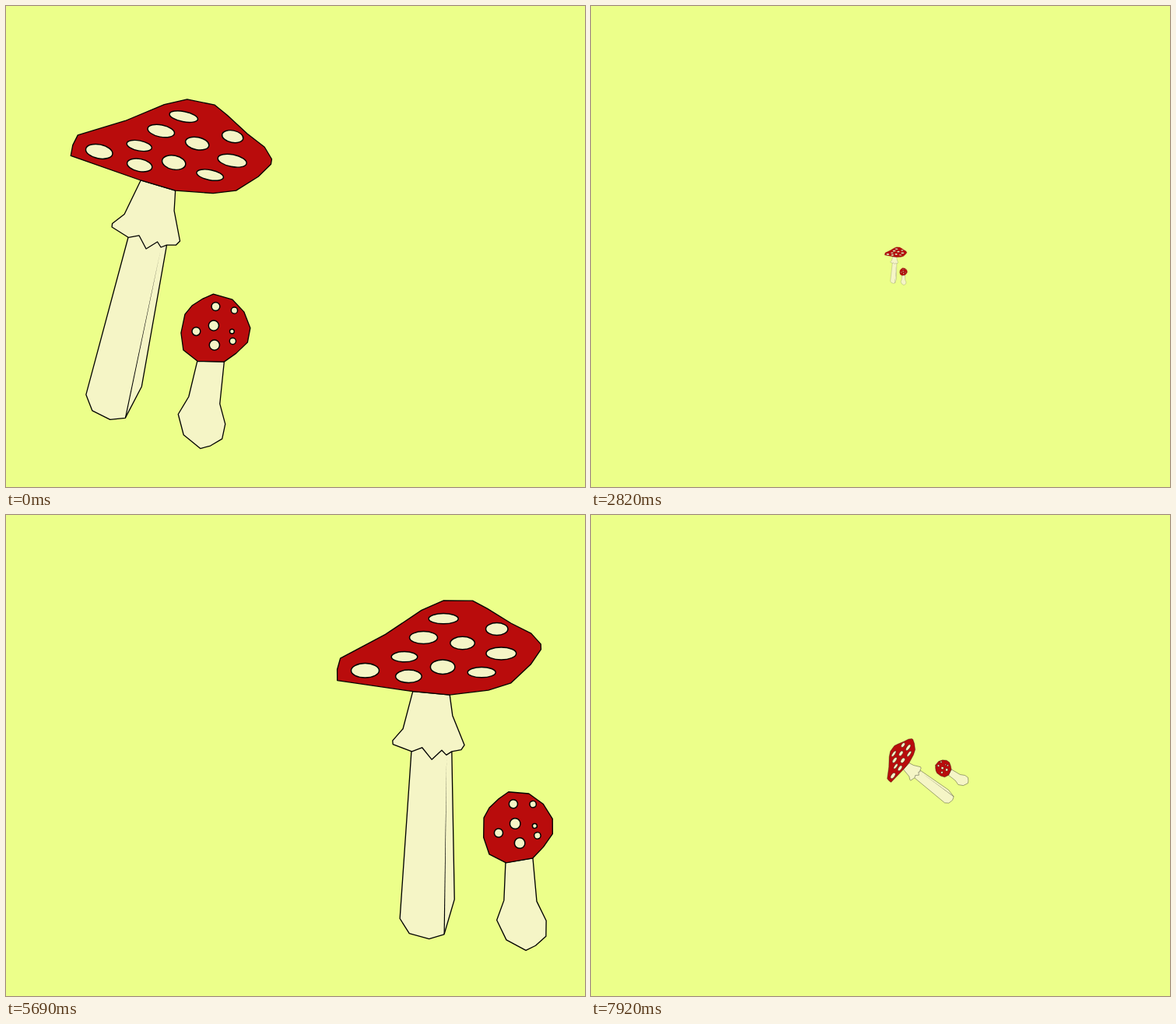
An HTML page without scripts for the animation above (7.99 s loop, 744 px wide and 618 px high).

```html
<!DOCTYPE html>
<html lang="en">
<head>
<meta charset="utf-8">
<title>Tumbling mushrooms</title>
<style>
  html, body { margin: 0; width: 100%; height: 100%; overflow: hidden; background: #ecff8a; }
  svg { display: block; width: 744px; height: 618px; }

  .drift, .tumble { animation: 7990ms linear infinite; }
  .drift { animation-name: drift; }
  .tumble { animation-name: tumble; transform-origin: 0 0; }

  .ink { stroke: #000; stroke-width: 1.3; stroke-linejoin: round; }
  .red { fill: #b90c0c; }
  .cream { fill: #f5f5c6; }
  .spots { stroke-width: 1.45; }
  .spots ellipse { transform-box: fill-box; transform-origin: center; rotate: 11deg; }

  /* side to side: left, right, and part of the way back */
  @keyframes drift {
    0%     { translate: 192px 333.8px; animation-timing-function: cubic-bezier(.33, .12, .67, .58); }
    17.02% { translate: 274.2px 333.8px; }
    35.29% { translate: 391.6px 333.8px; animation-timing-function: cubic-bezier(.33, .35, .67, .75); }
    58.7%  { translate: 536.2px 333.8px; animation-timing-function: cubic-bezier(.3, .58, .6, 1); }
    70.78% { translate: 563.5px 333.8px; animation-timing-function: cubic-bezier(.4, 0, .7, .46); }
    80.85% { translate: 540.5px 333.8px; animation-timing-function: cubic-bezier(.33, .23, .67, .65); }
    99.12% { translate: 427.4px 333.8px; }
    100%   { translate: 421.6px 333.8px; }
  }

  /* one full turn while shrinking to a tenth, one while growing back */
  @keyframes tumble {
    0%     { rotate: 0deg; scale: 1; animation-timing-function: cubic-bezier(.33, .2, .67, .62); }
    6.95%  { rotate: 70.8deg; scale: .8185; }
    17.02% { rotate: 198.5deg; scale: .4893; }
    25.22% { rotate: 294.5deg; scale: .2405; animation-timing-function: cubic-bezier(.33, .58, .6, 1); }
    33.82% { rotate: 348.4deg; scale: .1026; animation-timing-function: cubic-bezier(.35, .03, .65, .48); }
    43.89% { rotate: 430.8deg; scale: .3152; }
    53.97% { rotate: 558.5deg; scale: .6447; }
    58.7%  { rotate: 614.75deg; scale: .789; animation-timing-function: cubic-bezier(.35, .53, .6, 1); }
    70.78% { rotate: 708.5deg; scale: 1.0295; animation-timing-function: cubic-bezier(.35, .03, .65, .48); }
    80.85% { rotate: 790.8deg; scale: .8185; }
    90.93% { rotate: 918.5deg; scale: .4893; }
    99.12% { rotate: 1014.5deg; scale: .2405; }
    100%   { rotate: 1024.3deg; scale: .216; }
  }
</style>
</head>
<body>
<svg viewBox="0 0 744 618">
  <g class="drift"><g class="tumble"><g class="ink" transform="translate(-192 -333.8)">

    <!-- large mushroom: the stalk's top edge hides under the skirt -->
    <path class="cream" d="M160.5 284 103 499.5 111 520 134 531.5 153.5 529.5 174.5 489 210 287Z"/>
    <path stroke="none" d="M153 529.5 154.6 528 198.5 314Z"/>
    <path class="cream" d="M173 224 152 267.5 136.5 279.5 136 284 157.5 297.5 171 295 180 312 194.5 303 199 310 206.5 307 218.5 307 223.5 302 216 263 217.5 237Z"/>
    <path class="red" d="M83 192.5 85.5 179 92 166 153 147.5 203 126.5 232.5 119.8 268 127 284 140 310 164 332 181 341.3 196.5 340.3 203 324 219 295.5 237 266 240.5 217.5 237 173 224Z"/>
    <g class="cream spots">
      <ellipse cx="228" cy="142" rx="18.5" ry="6.5"/>
      <ellipse cx="199" cy="160.5" rx="17.5" ry="7.7"/>
      <ellipse cx="171" cy="179.5" rx="16.3" ry="6.5"/>
      <ellipse cx="119.5" cy="187" rx="17.5" ry="9"/>
      <ellipse cx="171.5" cy="204.5" rx="16.3" ry="8"/>
      <ellipse cx="215.5" cy="201" rx="15.3" ry="9"/>
      <ellipse cx="245.5" cy="176.5" rx="15.3" ry="8"/>
      <ellipse cx="291" cy="167.5" rx="13.8" ry="7.7"/>
      <ellipse cx="290.5" cy="198.5" rx="18.8" ry="7.8"/>
      <ellipse cx="262" cy="217" rx="17.5" ry="6.5"/>
    </g>

    <!-- small mushroom -->
    <path class="cream" d="M246 456 235 502 221.5 524.5 228.5 551 250 568.5 263 565 278 556 282 537 275 511 280.5 457Z"/>
    <path class="red" d="M266.5 370 291 377 306 393 314 413.5 310.5 432 296 446 280.5 457 246.5 456.5 228 442 225 420 230 396 239 385 253 376Z"/>
    <g class="cream spots">
      <circle cx="269.5" cy="386" r="5.4"/>
      <circle cx="293.5" cy="391" r="4.1"/>
      <circle cx="267" cy="410.5" r="6.6"/>
      <circle cx="244.5" cy="418" r="5.4"/>
      <circle cx="290.5" cy="418" r="2.9"/>
      <circle cx="291.5" cy="430.5" r="4.1"/>
      <circle cx="268" cy="435.5" r="6.6"/>
    </g>

  </g></g></g>
</svg>
</body>
</html>
```
